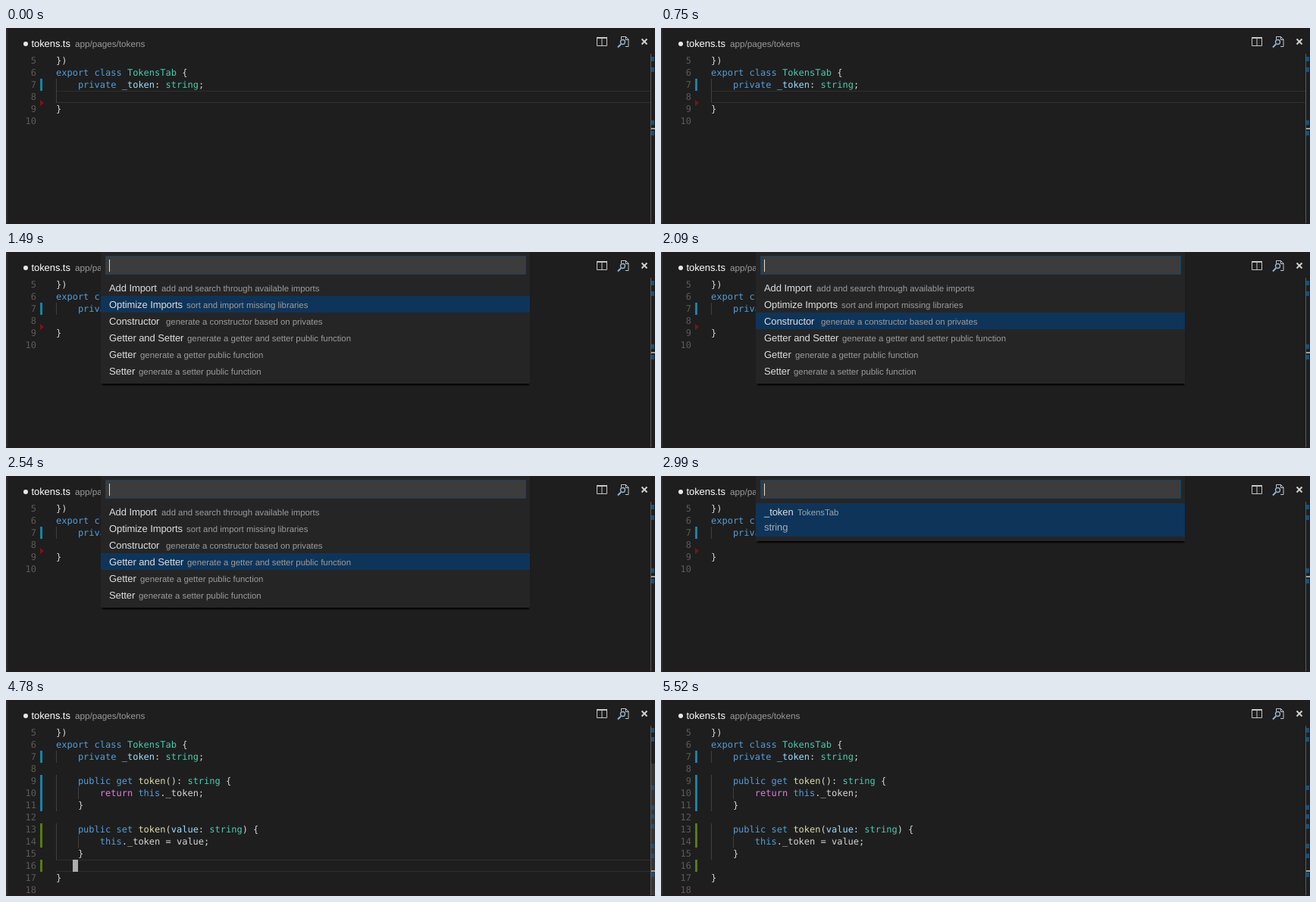
An HTML page for the animation above (5.62 s loop, 856 by 259 pixels).

```html
<!DOCTYPE html>
<html lang="en">
<head>
<meta charset="utf-8">
<title>Getter and setter generator</title>
<style>
html, body { margin: 0; width: 100%; height: 100%; overflow: hidden; background: #1e1e1e; }
svg { display: block; width: 856px; height: 259px; }
text { white-space: pre; text-rendering: geometricPrecision; }
.code { font: 12px "DejaVu Sans Mono", monospace; }
.ui { font: 13px "Liberation Sans", Arial, sans-serif; letter-spacing: -.08px; }
.small { font: 11.36px "Liberation Sans", Arial, sans-serif; }
.path { font: 11.7px "Liberation Sans", Arial, sans-serif; }
</style>
</head>
<body>
<svg id="stage" viewBox="0 0 856 259">
  <defs>
    <filter id="soft" x="-5%" y="-10%" width="110%" height="120%"><feGaussianBlur stdDeviation="1.2"/></filter>
  </defs>
</svg>
<script>
const LOOP = 5620;
const INK = {
  d: '#d4d4d4', k: '#569cd6', t: '#4ec9b0', v: '#9cdcfe', f: '#dcdcaa', r: '#d67fdc'
};
const BLUE = '#1b81a8', OLIVE = '#587c0c', MARK = '#17507c';
const stage = document.getElementById('stage');

function add(parent, tag, attrs = {}, content) {
  const el = document.createElementNS('http://www.w3.org/2000/svg', tag);
  for (const key in attrs) el.setAttribute(key, attrs[key]);
  if (content !== undefined) el.textContent = content;
  parent.appendChild(el);
  return el;
}
const group = parent => add(parent, 'g');
const rect = (parent, x, y, width, height, fill) => add(parent, 'rect', { x, y, width, height, fill });
const label = (parent, x, y, cls, fill, str) => add(parent, 'text', { x, y, class: cls, fill }, str);
const show = (el, on) => el.setAttribute('visibility', on ? 'inherit' : 'hidden');
const lineTop = n => 35 + (n - 5) * 16;

// Each line is a list of [ink, text] pairs.
function codeLines(parent, first, lines) {
  lines.forEach((parts, i) => {
    const n = first + i, y = lineTop(n) + 12;
    add(parent, 'text', { x: 40, y, class: 'code', fill: '#5a5a5a', 'text-anchor': 'end' }, n);
    const row = add(parent, 'text', { x: 66, y, class: 'code' });
    for (const [ink, str] of parts) add(row, 'tspan', { fill: INK[ink] }, str);
  });
}
const guide = (parent, x, from, to) =>
  rect(parent, x, lineTop(from), 1, (to - from + 1) * 16, '#404040');
const bar = (parent, from, to, fill) =>
  rect(parent, 45, lineTop(from), 3, (to - from + 1) * 16, fill);
const wedge = (parent, y) =>
  add(parent, 'path', { d: `M45 ${y - 4}l5 4l-5 4z`, fill: '#7d1414' });
const marks = (parent, tops) => tops.forEach(y => rect(parent, 851, y, 4, 6, MARK));

function activeLine(parent, n) {
  const g = group(parent), y = lineTop(n);
  rect(g, 66, y, 784, 1, '#303030');
  rect(g, 66, y + 15, 784, 1, '#303030');
  return g;
}

rect(stage, 0, 0, 856, 259, '#1e1e1e');

const head = [
  [['d', '})']],
  [['k', 'export class '], ['t', 'TokensTab'], ['d', ' {']],
  [['k', '    private '], ['v', '_token'], ['d', ': '], ['t', 'string'], ['d', ';']],
  []
];
const close = [['d', '}']];

// Editor before the code is generated
const before = group(stage);
const line8 = activeLine(before, 8);
guide(line8, 66, 8, 8);
guide(before, 66, 7, 7);
codeLines(before, 5, [...head, close, []]);
wedge(before, 99);
marks(before, [38, 52, 122, 136]);
rect(before, 851, 132, 5, 2, '#a0a0a0');

// Editor after the code is generated
const after = group(stage);
const line16 = activeLine(after, 16);
guide(after, 66, 7, 7);
guide(after, 66, 9, 11);
guide(after, 66, 13, 15);
guide(after, 95, 10, 10);
guide(after, 95, 14, 14);
codeLines(after, 5, [
  ...head,
  [['k', '    public get '], ['f', 'token'], ['d', '(): '], ['t', 'string'], ['d', ' {']],
  [['r', '        return '], ['k', 'this'], ['d', '._token;']],
  [['d', '    }']],
  [],
  [['k', '    public set '], ['f', 'token'], ['d', '('], ['v', 'value'], ['d', ': '], ['t', 'string'], ['d', ') {']],
  [['k', '        this'], ['d', '._token = value;']],
  [['d', '    }']],
  [],
  close,
  []
]);
const slider = rect(after, 851, 84, 5, 175, '#797979');
const oldWedge = wedge(after, 227);
marks(after, [37, 49, 113, 228]);
rect(after, 851, 225, 5, 2, '#a0a0a0');

const changes = group(after);
bar(changes, 9, 11, BLUE);
bar(changes, 13, 14, OLIVE);
bar(changes, 16, 16, OLIVE);
marks(changes, [139, 151, 164, 190, 203]);

// Window frame and toolbar
bar(stage, 7, 7, BLUE);
const block = rect(stage, 88, 0, 7, 16, '#aeafad');
rect(stage, 850, 34, 1, 225, '#5c5c5c');
rect(stage, 0, 0, 2, 259, '#2d2d2d');
rect(stage, 0, 258, 856, 1, '#251c22');
add(stage, 'circle', { cx: 26, cy: 21, r: 3, fill: '#e8e8e8' });
label(stage, 33.5, 25, 'ui', '#ffffff', 'tokens.ts');
label(stage, 91, 25, 'path', '#9a9a9a', 'app/pages/tokens');

const icon = (d, width, stroke = '#c5c5c5') =>
  add(stage, 'path', { d, fill: 'none', stroke, 'stroke-width': width });
icon('M779.5 13v10.5h13V13M786 13v10', 1);
icon('M779 13h14', 2);
icon('M811.5 15v-3.5h6l3.5 3.5v9.5h-4M817.5 11.5v4h3.5', 1);
icon('M811 21.5l-4 4', 2, '#8fb5d0');
add(stage, 'circle', { cx: 813.5, cy: 18.5, r: 3, fill: 'none', stroke: '#8fb5d0', 'stroke-width': 1.4 });
icon('M838.5 14.5l7 7M845.5 14.5l-7 7', 2, '#d0d0d0');

// Quick pick panel
const panel = group(stage);
const shadow = rect(panel, 127, 0, 563, 0, '#000');
shadow.setAttribute('filter', 'url(#soft)');
const sheet = rect(panel, 125, 0, 566, 0, '#252526');
const pick = rect(panel, 125, 36, 566, 22, '#0f3459');
add(panel, 'rect', { x: 131.5, y: 5.5, width: 554, height: 24, fill: '#3c3c3c', stroke: '#17405f' });
const caret = rect(panel, 136, 10, 1, 16, '#e0e0e0');

const menu = group(panel);
[
  ['Add Import', 205, 'add and search through available imports'],
  ['Optimize Imports', 238, 'sort and import missing libraries'],
  ['Constructor', 211, 'generate a constructor based on privates'],
  ['Getter and Setter', 239, 'generate a getter and setter public function'],
  ['Getter', 177, 'generate a getter public function'],
  ['Setter', 175, 'generate a setter public function']
].forEach(([name, x, info], i) => {
  const y = 52 + i * 22;
  label(menu, 136, y, 'ui', '#dedede', name);
  label(menu, x, y, 'small', '#9b9b9b', info);
});

const field = group(panel);
label(field, 136, 52, 'ui', '#dedede', '_token');
label(field, 180, 52, 'small', '#98a4ae', 'TokensTab');
label(field, 136, 72, 'ui', '#a3adb6', 'string');

function draw(t) {
  const done = t >= 3740, open = t >= 890 && !done, choosing = t >= 2990;
  const saved = t >= 3890, left = t >= 5220;

  show(before, !done);
  show(line8, t < 890);
  show(after, done);
  show(line16, !left);
  show(oldWedge, !saved);
  show(changes, saved);
  show(slider, !left);
  slider.setAttribute('opacity', saved ? .25 : .16);

  block.setAttribute('y', lineTop(done ? 16 : 8));
  show(block, done ? t < 4180 || (t >= 4780 && !left) : t >= 300 && t < 750);

  show(panel, open);
  show(menu, !choosing);
  show(field, choosing);
  show(caret, t < 3440);
  const row = choosing ? 0 : [1490, 2090, 2540].filter(at => t >= at).length;
  const bottom = choosing ? 86 : 174;
  pick.setAttribute('y', 36 + row * 22);
  pick.setAttribute('height', choosing ? 44 : 22);
  sheet.setAttribute('height', bottom);
  shadow.setAttribute('height', bottom + 2);
}

const start = performance.now();
function tick() {
  draw((performance.now() - start) % LOOP);
  requestAnimationFrame(tick);
}
tick();
</script>
</body>
</html>
```
